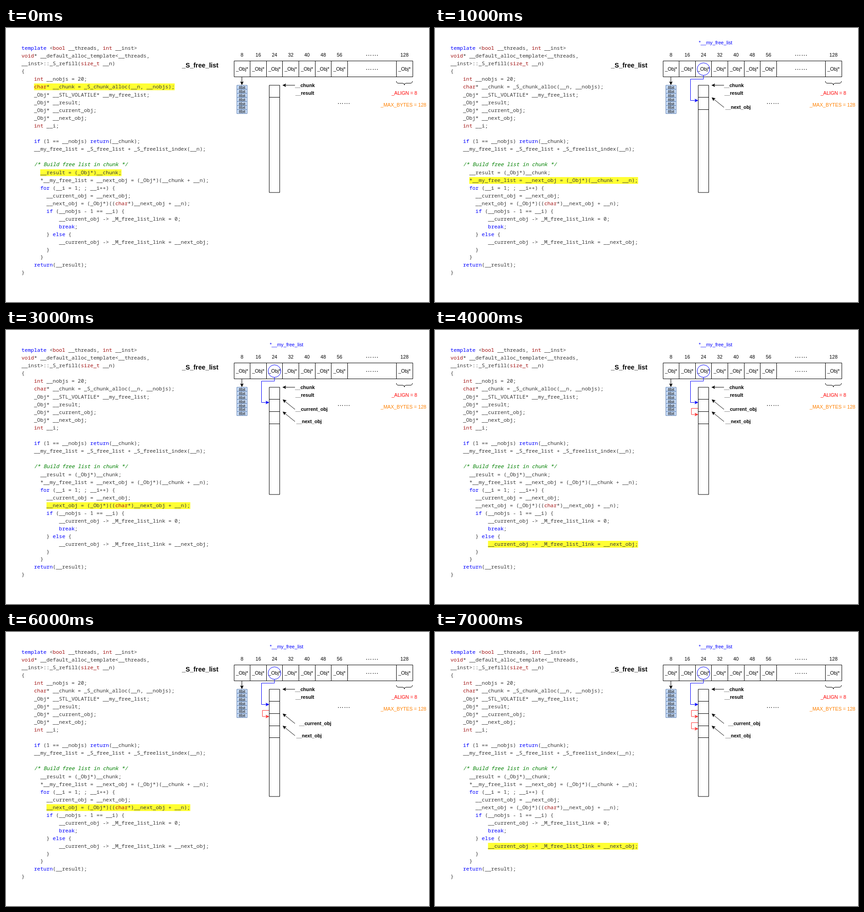
Write an HTML page that moves like this. It is 928 by 603 pixels and loops after 8000 ms.

```html
<!DOCTYPE html>
<html lang="en">
<head>
<meta charset="utf-8">
<title>Free list refill</title>
<style>
  html, body { margin: 0; width: 100%; height: 100%; overflow: hidden; background: #fff; }
  svg { display: block; width: 928px; height: 603px; }
  text { font: 10.69px "Liberation Sans", Arial, sans-serif; white-space: pre; }
  .bold { font-weight: bold; }
  .title { font-size: 14.26px; font-weight: bold; }
  .dots { font-size: 14.26px; }
  .bit { font-size: 8.91px; }
  .code { font: 11.43px "Noto Sans Mono", monospace; fill: #393939; }
  .key { fill: #00f; }
  .type { fill: #a31515; }
  .note { fill: #008000; font-style: italic; }
</style>
</head>
<body>
<svg viewBox="0 0 928 603"><g id="stage"></g></svg>
<script>
const CODE = `template <bool __threads, int __inst>
void* __default_alloc_template<__threads,
__inst>::_S_refill(size_t __n)
{
    int __nobjs = 20;
    char* __chunk = _S_chunk_alloc(__n, __nobjs);
    _Obj* __STL_VOLATILE* __my_free_list;
    _Obj* __result;
    _Obj* __current_obj;
    _Obj* __next_obj;
    int __i;

    if (1 == __nobjs) return(__chunk);
    __my_free_list = _S_free_list + _S_freelist_index(__n);

    /* Build free list in chunk */
      __result = (_Obj*)__chunk;
      *__my_free_list = __next_obj = (_Obj*)(__chunk + __n);
      for (__i = 1; ; __i++) {
        __current_obj = __next_obj;
        __next_obj = (_Obj*)((char*)__next_obj + __n);
        if (__nobjs - 1 == __i) {
            __current_obj -> _M_free_list_link = 0;
            break;
        } else {
            __current_obj -> _M_free_list_link = __next_obj;
        }
      }
    return(__result);
}`.split("\n");

const CHAR = 6.858, CELL = 35.64, BLOCK = 26.73;
const BLUE = "#00f", RED = "#f33";

// lines: highlighted code rows; cells: marked blocks; links: red links
// pointers: block indices that get an arrow; labels: [text, x, y]
const STATES = [
  { lines: [5, 16], cells: 1, links: 0, pointers: [], labels: [] },
  { lines: [17], cells: 2, links: 0, pointers: [1], labels: [["__next_obj", 637, 174]] },
  { lines: [19], cells: 2, links: 0, pointers: [1],
    labels: [["__next_obj", 637, 174], ["__current_obj", 643, 188]] },
  { lines: [20], cells: 3, links: 0, pointers: [1, 2],
    labels: [["__current_obj", 635, 174], ["__next_obj", 637, 201]] },
  { lines: [25], cells: 3, links: 1, pointers: [1, 2],
    labels: [["__current_obj", 635, 174], ["__next_obj", 637, 201]] },
  { lines: [19], cells: 3, links: 1, pointers: [2], lift: 1,
    labels: [["__next_obj", 637, 201], ["__current_obj", 706, 201]] },
  { lines: [20], cells: 4, links: 1, pointers: [2, 3],
    labels: [["__current_obj", 643, 201], ["__next_obj", 637, 228]] },
  { lines: [25], cells: 4, links: 2, pointers: [2, 3],
    labels: [["__current_obj", 643, 201], ["__next_obj", 637, 228]] },
];

const crisp = v => Math.floor(v) + 0.5;
const path = (d, color = "#000", fill = "none") =>
  `<path d="${d}" stroke="${color}" fill="${fill}"/>`;
const box = (x, y, w, h, fill = "none", color = "#000") =>
  path(`M${x} ${y}h${w}v${h}h${-w}z`, color, fill);
const label = (text, x, y, cls = "", anchor = "middle", color = "#000") =>
  `<text x="${x}" y="${y + 3.8}" class="${cls}" text-anchor="${anchor}" fill="${color}">${text}</text>`;

function arrow(points, color = "#000") {
  const [[px, py], [x, y]] = points.slice(-2);
  const angle = Math.atan2(y - py, x - px);
  const end = [x - 5 * Math.cos(angle), y - 5 * Math.sin(angle)];
  return path("M" + [...points.slice(0, -1), end].join("L"), color) +
    `<path d="M0 0L-7 -3.3L-5.3 0L-7 3.3Z" fill="${color}" stroke="${color}" stroke-width=".6"
      transform="translate(${x} ${y}) rotate(${angle * 180 / Math.PI})"/>`;
}

const rowCenter = i => Math.round(44.3 + 16.97 * i + (i > 5) + (i > 15));

function colorize(line) {
  return line.replace(/</g, "&lt;")
    .replace(/\/\*.*\*\//, '<tspan class="note">$&</tspan>')
    .replace(/\b(template|if|for|else|break|return)\b/g, '<tspan class="key">$&</tspan>')
    .replace(/\b(bool|int|void|char|size_t)\b/g, '<tspan class="type">$&</tspan>');
}

const codeText = CODE.map((line, i) => {
  const text = line.trimStart();
  const x = 34 + (line.length - text.length) * CHAR;
  return `<text class="code" x="${x}" y="${rowCenter(i) + 4}">${colorize(text)}</text>`;
}).join("");

function highlight(i) {
  const text = CODE[i].trimStart();
  const x = 34 + (CODE[i].length - text.length) * CHAR;
  return `<rect x="${x}" y="${rowCenter(i) - 7}" width="${text.length * CHAR}" height="15" fill="#ff3"/>`;
}

function drawTable() {
  let out = label("_S_free_list", 426, 83, "title") + box(500.5, 72.5, 392, 35);
  for (const i of [0, 1, 2, 3, 4, 5, 6, 10]) {
    const center = 500 + CELL * (i + 0.5);
    out += label(i === 10 ? 128 : 8 * (i + 1), center, 59) + label("_Obj*", center, 90);
    out += path(`M${crisp(500 + CELL * (i < 10 ? i + 1 : i))} 72.5v35`);
  }
  for (const [x, y] of [[803, 60], [803, 91], [741, 166.5]])
    out += label("……", x, y - 3, "dots");

  out += arrow([[517.5, 108], [517.5, 125]]);
  for (let i = 0; i < 7; i++) {
    const y = 126 + 8.91 * i;
    out += box(506.5, y, 22.6, 8.91, "#cce0fb", "#5d7fb0") + label("8bit", 518, y + 4.1, "bit");
  }
  return out + path("M856.5 117q0 4.5 4.5 4.5h9q4 0 4 4q0 -4 4 -4h9q4.500 0 4.500 -4.500") +
    label("_ALIGN = 8", 874, 143, "", "middle", "#f00") +
    label("_MAX_BYTES = 128", 872, 169, "", "middle", "#ff8000");
}

function drawChunk({ cells, links, pointers, labels }, hasList) {
  let out = box(577.5, 126, 23, 236);
  for (let i = 1; i <= cells; i++) out += path(`M577.5 ${crisp(126 + BLOCK * i)}h23`);
  out += arrow([[634, 126], [607, 126]]) +
    label("__chunk", 634, 126, "bold", "start") + label("__result", 635, 143, "bold", "start");
  for (const i of pointers) {
    const y = 126 + BLOCK * i;
    out += arrow([[634, y + 22], [607.5, y + 0.5]]);
  }
  for (const [text, x, y] of labels) out += label(text, x, y, "bold", "start");
  if (hasList) {
    out += label("*__my_free_list", 615.5, 32, "", "middle", BLUE) +
      `<circle cx="589" cy="90.500" r="13.8" fill="none" stroke="${BLUE}"/>` +
      arrow([[589, 104], [589, 112.5], [560.5, 112.5], [560.5, 159.5], [577, 159.5]], BLUE);
  }
  for (let i = 0; i < links; i++) {
    const y = crisp(172.5 + BLOCK * i);
    out += arrow([[577, y], [562.5, y], [562.5, y + 13.5], [577, y + 13.5]], RED);
  }
  return out;
}

const table = drawTable();
const scenes = STATES.map((state, i) =>
  `<g transform="translate(0 ${-(state.lift || 0)})">` +
  state.lines.map(highlight).join("") + codeText + table + drawChunk(state, i > 0) + "</g>");

const stage = document.getElementById("stage");
let shown = -1;
function frame() {
  const index = Math.floor(performance.now() % 8000 / 1000);
  if (index !== shown) stage.innerHTML = scenes[shown = index];
  requestAnimationFrame(frame);
}
frame();
</script>
</body>
</html>
```
